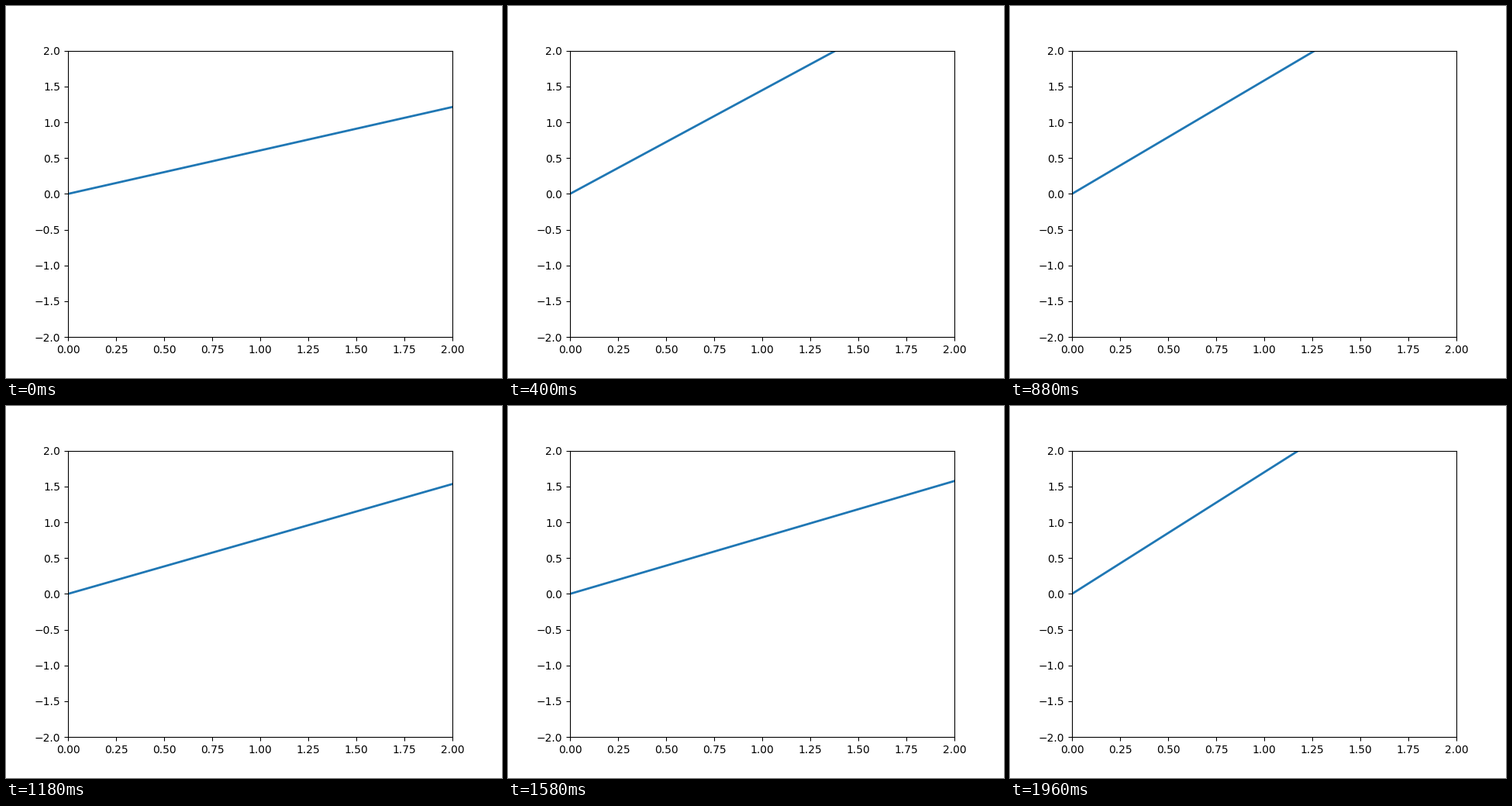
A matplotlib script that plays this animation: 640 by 480 pixels, repeating every 1.98 s.

```python
import numpy as np
import matplotlib.pyplot as plt
from matplotlib.animation import FuncAnimation

FRAMES = 99
INTERVAL = 20

# Line gradient at a few key steps, joined by a natural cubic spline in log space
KEYS = np.array([0, 12, 28, 44, 54, 59, 79, 98], dtype=float)
GRADIENTS = np.array([0.6065, 0.849, 2.257, 1.583, 0.913, 0.767, 0.788, 1.698])


def natural_spline(keys, values, at):
    n = len(keys)
    cubic = np.abs(keys[:, None] - keys) ** 3
    linear = np.column_stack([np.ones(n), keys])
    system = np.block([[cubic, linear], [linear.T, np.zeros((2, 2))]])
    coef = np.linalg.solve(system, np.append(values, [0, 0]))
    return np.abs(at[:, None] - keys) ** 3 @ coef[:n] + coef[n] + coef[n + 1] * at


slopes = np.exp(natural_spline(KEYS / 100, np.log(GRADIENTS), np.arange(FRAMES) / 100))

fig = plt.figure(figsize=(6.4, 4.8), dpi=100)
ax = plt.axes(xlim=(0, 2), ylim=(-2, 2))
line, = ax.plot([], [], lw=2)
x = np.linspace(0, 2, 100)


def update(i):
    line.set_data(x, slopes[i] * x)
    return line,


anim = FuncAnimation(fig, update, frames=FRAMES, interval=INTERVAL,
                     repeat=True, repeat_delay=0, blit=False)
plt.show()
```
